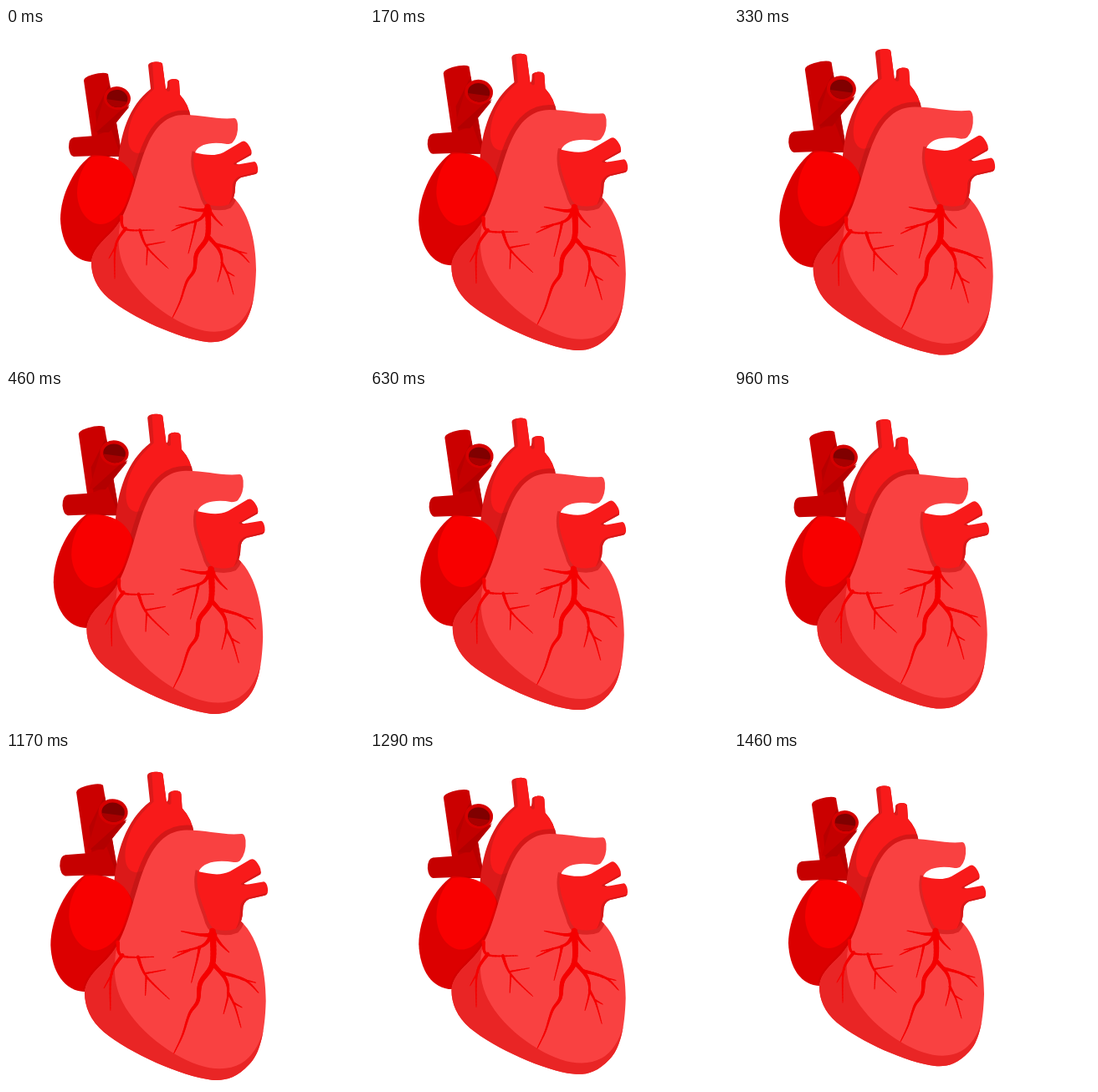
Animation, 428 px wide and 400 px high, one loop 1.5 s. Source, as an HTML page with a canvas:

```html
<!DOCTYPE html>
<html lang="en">
<head>
<meta charset="utf-8">
<title>Beating heart</title>
<style>
  html, body { margin: 0; width: 100%; height: 100%; overflow: hidden; background: #fff; }
  canvas { display: block; }
</style>
</head>
<body>
<canvas id="stage" width="428" height="400"></canvas>
<script>
const ctx = document.getElementById('stage').getContext('2d');
const LOOP = 1500, STEP = LOOP / 36;
const CENTER_X = 182, CENTER_Y = 208;
// [time in ms, scale]
const BEAT = [[0, 1], [285, 1.1], [860, 1], [1167, 1.1], [1458, 1]];

const shape = d => new Path2D(d);

const cava = shape('M93 63Q93 59 103 56Q117 52 122 55L139 154L106 154Z');
const cavaShade = shape('M107 100L124 66L139 154L112 154Z');
const sideTube = shape('M81 131L107 129L126 122L137 152L81 154Q76 153 75 143Q75 132 81 131Z');
const branch = shape('M118 81L105 124L122 125L147 95Z');
const branchShade = shape('M139 97L108 125L123 125L148 92Z');

const rightAtrium = shape('M103 152C82 166 65 200 65 229C66 258 80 280 103 280L135 262L156 190C153 167 132 151 103 152Z');
const rightAtriumLight = shape('M103 154C92 164 85 180 85 198C86 220 99 235 113 235C130 235 149 212 153 184C151 165 132 150 103 154Z');

const aorta = shape('M170 45Q170 41 178 40.5Q186 40 187 43L191 73Q193 73 193 66Q192 62 200 61Q207 61 207 65L208 80Q219 92 221 108L153 186L134 164C136 128 147 93 173 73Z');
const aortaLight = shape('M175 41L188 38L191 73Q193 78 196 75L196 60L208 60L221 108C190 112 182 149 157 150Q146 148 146 131C147 106 160 88 177 73Z');

const ventricle = shape('M273 108Q276 108 277 115Q278 129 271 137Q269 139 264 139C248 136 231 138 226 149L240 200L268 200C290 216 299 255 299 290C298 326 292 348 281 359C266 375 254 377 240 376C207 372 151 347 123 324C108 311 102 296 102 281C104 258 128 249 138 228C152 202 158 164 169 140C179 117 193 104 213 104C236 104 252 110 273 108Z');
const ventricleShade = shape('M95 240L137 231C132 258 134 280 151 304C164 322 182 337 199 347C229 365 254 368 272 358Q289 348 297 320L310 390L95 390Z');

const leftAtrium = shape('M225 149C239 152 249 154 260 149L282 136Q286 134 290 140Q295 147 293 152L275 162Q276 164 280 163L297 160Q300 161 301 167Q302 174 298 175L281 179Q274 182 274 191Q274 204 267 211Q258 215 244 212Q237 209 234 196C228 179 222 165 225 149Z');
const tubeShade = shape('M294 149L272 162Q272 165 280 163L294 154ZM301 172L278 178Q270 183 271 192Q271 203 266 212L290 190Z');

// start width, then x, y pairs
const rightVeins = [
  [7, 241, 214, 241, 249, 228, 270, 225, 290, 216, 304, 208, 328, 199, 347],
  [5, 241, 218, 228, 218, 207, 214],
  [4, 242, 217, 250, 228, 259, 237],
  [5, 240, 218, 230, 230, 203, 237],
  [2.5, 217, 234, 198, 243],
  [3, 227, 231, 224, 246, 218, 270],
  [5, 241, 249, 255, 266, 258, 282, 253, 304],
  [4, 250, 259, 276, 267, 291, 281],
  [2, 272, 266, 288, 270],
  [3, 258, 281, 265, 295, 272, 319],
  [2, 264, 292, 273, 297],
];
const leftVeins = [
  [4, 138, 226, 143, 241, 177, 242],
  [4, 143, 240, 131, 261, 130, 300],
  [2, 132, 260, 123, 276],
  [3.5, 160, 242, 169, 263, 194, 288],
  [2, 168, 260, 190, 256],
  [2, 169, 263, 168, 284],
];

function fill(path, color) {
  ctx.fillStyle = color;
  ctx.fill(path);
}

function inside(path, draw) {
  ctx.save();
  ctx.clip(path);
  draw();
  ctx.restore();
}

function castShadow(path, width, color) {
  ctx.strokeStyle = color;
  ctx.lineWidth = width;
  ctx.stroke(path);
}

function oval(x, y, rx, ry, color, from = 0, to = 7) {
  ctx.beginPath();
  ctx.ellipse(x, y, rx, ry, .15, from, to);
  ctx.fillStyle = color;
  ctx.fill();
}

function spline(a, b, c, d, t) {
  return b + t / 2 * (c - a + t * (2 * a - 5 * b + 4 * c - d + t * (3 * (b - c) + d - a)));
}

// Tapered curve through the points
function vein([width, ...xy]) {
  const last = xy.length / 2 - 1, parts = last * 10;
  const coord = (i, axis) => xy[2 * Math.max(0, Math.min(last, i)) + axis];
  const at = s => {
    const i = Math.min(last - 1, Math.floor(s));
    return [0, 1].map(k => spline(coord(i - 1, k), coord(i, k), coord(i + 1, k), coord(i + 2, k), s - i));
  };
  for (let n = 0; n < parts; n++) {
    ctx.lineWidth = width + (.8 - width) * n / parts;
    ctx.beginPath();
    ctx.moveTo(...at(n / 10));
    ctx.lineTo(...at((n + 1) / 10));
    ctx.stroke();
  }
}

function drawHeart() {
  fill(cava, '#cb0000');
  inside(cava, () => fill(cavaShade, '#b90000'));
  fill(sideTube, '#c60000');
  fill(branch, '#c40000');
  fill(branchShade, '#b30000');
  oval(133, 84, 16, 14, '#d50000');
  oval(133, 84.5, 12.5, 10.5, '#800000');
  oval(133, 84.5, 12.5, 10.5, '#a80000', .2, 2.9);

  fill(aorta, '#db1919');
  inside(aorta, () => {
    fill(aortaLight, '#f81a1a');
    castShadow(ventricle, 11, 'rgba(185,20,20,.55)');
  });

  fill(rightAtrium, '#dc0000');
  fill(rightAtriumLight, '#f80000');
  inside(rightAtrium, () => castShadow(ventricle, 5, 'rgba(200,0,0,.4)'));

  fill(ventricle, '#f94141');
  inside(ventricle, () => {
    fill(ventricleShade, '#e92525');
    ctx.translate(0, 2);
    castShadow(leftAtrium, 6, '#dc2424');
  });

  ctx.strokeStyle = '#f50000';
  ctx.lineCap = 'round';
  oval(241, 218, 5, 4, '#f50000');
  rightVeins.forEach(vein);
  leftVeins.forEach(vein);
  fill(leftAtrium, '#f81a1a');
  inside(leftAtrium, () => fill(tubeShade, '#d81818'));
}

function scaleAt(t) {
  const i = BEAT.findIndex(key => key[0] >= t);
  if (i < 1) return 1;
  const [t0, s0] = BEAT[i - 1], [t1, s1] = BEAT[i];
  return s0 + (s1 - s0) * (t - t0) / (t1 - t0);
}

function frame() {
  const step = Math.floor((performance.now() % LOOP + 4) / STEP) % 36;
  const s = scaleAt(step * STEP);
  ctx.setTransform(1, 0, 0, 1, 0, 0);
  ctx.fillStyle = '#fff';
  ctx.fillRect(0, 0, 428, 400);
  ctx.setTransform(s, 0, 0, s, CENTER_X * (1 - s), CENTER_Y * (1 - s));
  drawHeart();
  requestAnimationFrame(frame);
}
frame();
</script>
</body>
</html>
```
